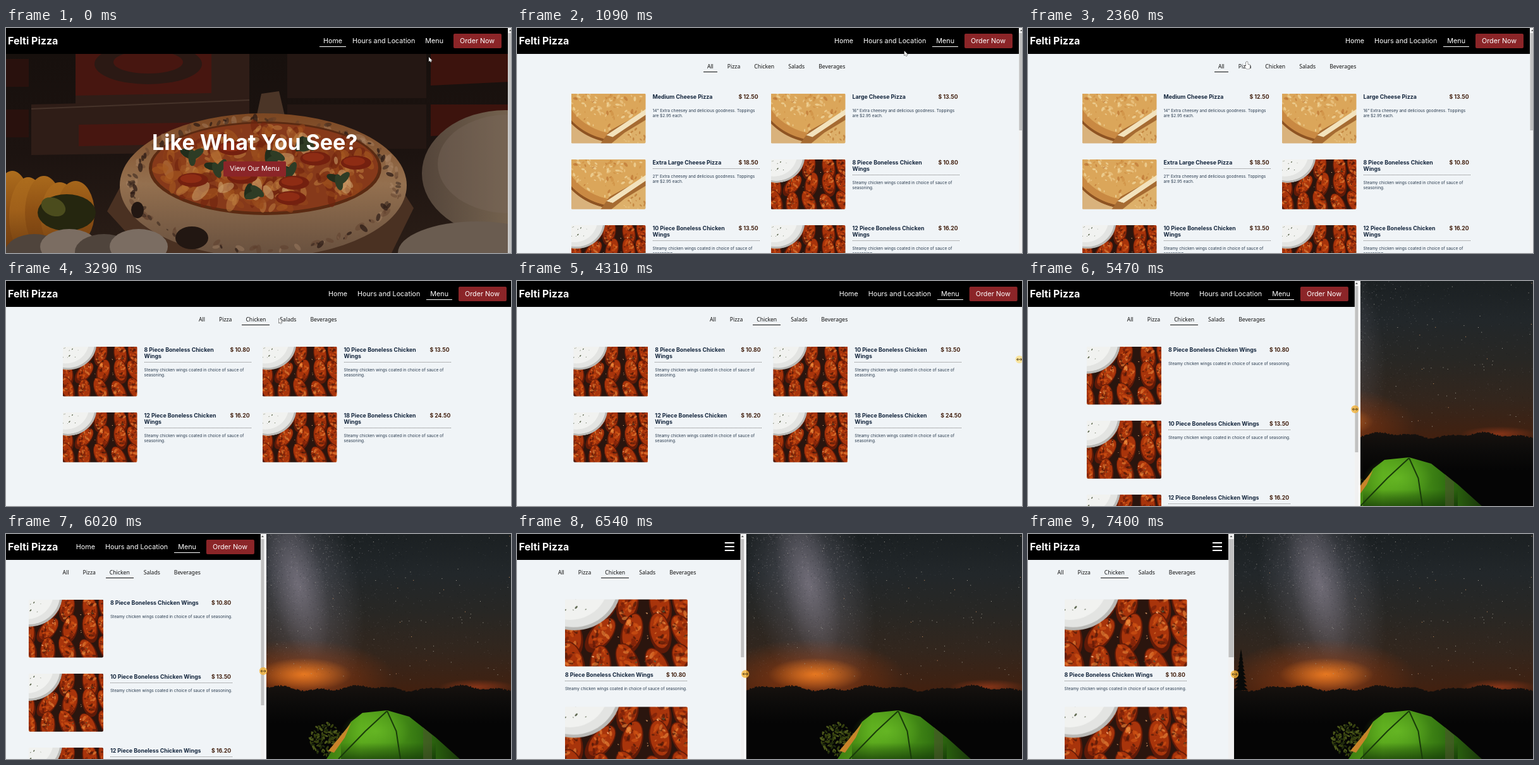
Write an HTML page with a canvas that moves like this. It is 799 px wide and 356 px high and loops after 7500 ms.

```html
<!DOCTYPE html>
<html lang="en">
<head>
<meta charset="utf-8">
<title>Felti Pizza</title>
<style>
html, body { margin: 0; width: 100%; height: 100%; overflow: hidden; background: #f0f4f7; }
canvas { display: block; }
</style>
</head>
<body>
<canvas id="stage" width="799" height="356"></canvas>
<script>
const LOOP = 7500, WIDTH = 799, HEIGHT = 356;
const stage = document.getElementById('stage').getContext('2d');
let g = stage;

// ---------- drawing helpers ----------
function rect(x, y, w, h, color) { g.fillStyle = color; g.fillRect(x, y, w, h); }
function round(x, y, w, h, r, color) {
  g.fillStyle = color; g.beginPath(); g.roundRect(x, y, w, h, r); g.fill();
}
function oval(x, y, rx, ry, color, turn = 0) {
  g.fillStyle = color; g.beginPath(); g.ellipse(x, y, rx, ry, turn, 0, 7); g.fill();
}
function trace(points) {
  g.beginPath();
  for (let i = 0; i < points.length; i += 2) g.lineTo(points[i], points[i + 1]);
}
function poly(color, ...points) { trace(points); g.fillStyle = color; g.fill(); }
function line(color, width, ...points) {
  trace(points); g.strokeStyle = color; g.lineWidth = width; g.stroke();
}
function text(str, x, y, size, color, weight = 400, family = 'Inter, sans-serif') {
  g.font = `${weight} ${size}px ${family}`; g.fillStyle = color; g.fillText(str, x, y);
  return g.measureText(str).width;
}
function textWidth(str, size, weight = 400, family = 'Inter, sans-serif') {
  g.font = `${weight} ${size}px ${family}`;
  return g.measureText(str).width;
}
function fade(x0, y0, x1, y1, ...colors) {
  const f = g.createLinearGradient(x0, y0, x1, y1);
  colors.forEach((c, i) => f.addColorStop(i / (colors.length - 1), c));
  return f;
}
function glow(x, y, rx, ry, rgb, alpha, turn = 0) {
  g.save(); g.translate(x, y); g.rotate(turn); g.scale(rx, ry);
  const f = g.createRadialGradient(0, 0, 0, 0, 0, 1);
  f.addColorStop(0, `rgba(${rgb},${alpha})`);
  f.addColorStop(1, `rgba(${rgb},0)`);
  oval(0, 0, 1, 1, f); g.restore();
}
function seeded(s) {
  return () => (s = (s * 16807) % 2147483647) / 2147483647;
}
// Random specks spread over an ellipse; inner = 1 keeps them on its rim.
function scatter(r, n, x, y, rx, ry, size, colors, inner = 0) {
  for (let i = 0; i < n; i++) {
    const a = r() * Math.PI * 2, d = Math.sqrt(inner + (1 - inner) * r()), s = size * (.3 + r());
    oval(x + rx * d * Math.cos(a), y + ry * d * Math.sin(a), s, s * .5, colors[i % colors.length], r() * 3);
  }
}
function picture(w, h, scale, paint) {
  const c = document.createElement('canvas');
  c.width = w * scale; c.height = h * scale;
  g = c.getContext('2d'); g.scale(scale, scale);
  paint(); g = stage;
  return c;
}

// ---------- pictures ----------
const wingsPic = picture(118, 79, 2, () => {
  const r = seeded(52);
  rect(0, 0, 118, 79, '#2a150e');
  for (let i = 0; i < 15; i++) {
    const x = 5 + (i % 5) * 27 + r() * 6, y = 10 + Math.floor(i / 5) * 28 + r() * 8;
    g.save(); g.translate(x, y); g.rotate(1.5 + (r() - .5) * 1.8);
    oval(0, 0, 20, 10.5, '#5f1a08');
    oval(-2, 0, 17, 9, '#a8340b');
    scatter(r, 26, -2, 0, 16, 7, 3, ['#d4561599', '#6e1c0899', '#ec8a3c99', '#3a120899']);
    g.restore();
  }
  scatter(r, 45, 70, 45, 55, 38, 1, ['#f3b27a', '#485c3a', '#2a150e']);
  oval(9, -6, 45, 43, '#b9b9b6');
  oval(8, -7, 43, 41, '#e3e4e2');
  oval(5, -9, 37, 36, '#f1f2f0');
  scatter(r, 14, 10, 6, 24, 16, 1.6, ['#59634a']);
});

const pizzaPic = picture(118, 79, 2, () => {
  const r = seeded(9);
  rect(0, 0, 118, 79, '#d9b27c');
  oval(78, -8, 101, 87, '#8e5322');
  oval(79, -10, 100, 85, '#c98943');
  oval(81, -12, 92, 77, '#dba65a');
  scatter(r, 330, 81, -12, 90, 75, 3.4, ['#f3dca5aa', '#edc988aa', '#b9702e99', '#cd8e4199']);
  poly('#a66b32', 47, 79, 61, 59, 118, 28, 118, 79);
  poly('#f2e2bd', 56, 66, 118, 25, 118, 34, 66, 69);
  poly('#ddb06a', 64, 79, 85, 62, 118, 42, 118, 79);
  scatter(r, 40, 108, 72, 24, 16, 2.4, ['#f0d092aa', '#b66e2a99']);
});

const heroPic = picture(WIDTH, HEIGHT, 1, () => {
  const r = seeded(77), stain = ['#33211a88', '#2a1a14bb'];
  rect(0, 0, WIDTH, HEIGHT, fade(0, 41, 0, HEIGHT, '#17100d', '#1c1310', '#2b1e17'));
  // stacked boxes with plain printed blocks
  for (let row = 0; row < 2; row++) {
    const y = 41 + row * 80, left = 110 - row * 70;
    poly('#2f1d17', left, y, 385, y - row * 8, 385, y + 75, left, y + 80);
    poly('#471610', left + row * 75, y + row * 32, 325, y + row * 28, 325, y + 62, left + row * 75, y + 66);
    poly('#241713', 445, y, 665, y, 665, y + 70, 445, y + 70);
    poly('#3c130d', 672, y, WIDTH, y, WIDTH, y + 44, 672, y + 50);
    rect(0, y + 8, 36, 44, '#29110d');
  }
  oval(225, 57, 85, 32, '#2b1914'); oval(225, 54, 55, 18, '#471610');
  line('#46332a', 2, 40, 128, 385, 114);
  // peel, crust and toppings
  poly('#4b3527', 404, 104, 432, 100, 446, 160, 392, 160);
  poly('#4a3122', 200, 215, 160, 290, 220, 356, 610, 356, 645, 285, 600, 215);
  oval(407, 249, 227, 114, fade(0, 136, 0, 356, '#7c4722', '#94704f', '#69513f'));
  scatter(r, 90, 407, 247, 218, 106, 7, ['#b3917355', '#5a3a2866'], .85);
  scatter(r, 60, 407, 247, 214, 108, 6, stain, .88);
  oval(410, 222, 184, 74, '#5a2a12');
  oval(410, 221, 179, 70, '#86391a');
  scatter(r, 300, 410, 221, 172, 64, 12, ['#a5581f99', '#c0803f88', '#6f230fa0', '#94461a99']);
  scatter(r, 16, 410, 225, 150, 48, 18, ['#c89b6799']);
  for (let i = 0; i < 14; i++) {
    const a = i * 2.4, d = Math.sqrt((i + .5) / 14);
    const x = 410 + 150 * d * Math.cos(a), y = 224 + 52 * d * Math.sin(a);
    if (i % 2) { oval(x, y, 24, 11, '#74200f'); oval(x - 3, y - 2, 17, 7, '#8e2c14'); }
    else for (let k = 0; k < 3; k++) oval(x + k * 7, y + (k % 2) * 6, 13, 6, k ? '#2e3c25' : '#222d1b', a + k);
  }
  oval(294, 332, 26, 18, '#221712'); oval(208, 288, 10, 13, '#221712');
  // vegetables and dough
  for (let i = 0; i < 5; i++)
    oval(10 + i * 25, 292 + (i % 2) * 6, 30, 66 - i * 4, fade(0, 220, 0, 356, '#b0701e', i % 2 ? '#a0601a' : '#8f5114', '#6e3c10'));
  oval(96, 292, 46, 29, '#25260f'); oval(75, 283, 20, 14, '#4b4c1d', .4);
  for (let i = 0; i < 4; i++) oval(45 + i * 55, 354 - (i % 2) * 8, 46, 28, ['#4f443c', '#7b6d62'][i % 2]);
  oval(790, 230, 132, 100, fade(660, 0, 799, 0, '#54453a', '#75634f'));
  oval(795, 215, 112, 78, '#78675a66');
  oval(745, 356, 125, 50, '#6a5c50');
});

const nightPic = picture(WIDTH, HEIGHT, 1, () => {
  const r = seeded(23), left = 326;
  rect(left, 0, WIDTH - left, HEIGHT, fade(0, 0, 0, 250, '#1b2022', '#22272a', '#282724', '#33261d', '#42200f'));
  glow(465, 85, 190, 95, '110,108,120', .6, 1.35);
  glow(460, 75, 130, 45, '160,150,165', .4, 1.35);
  glow(465, 226, 150, 60, '200,75,15', .55);
  glow(472, 222, 75, 26, '255,135,35', .8);
  glow(745, 242, 60, 12, '180,65,28', .6);
  for (let i = 0; i < 4500; i++) {
    const milky = i % 3, spread = milky ? (r() + r() + r() - 1.5) * 150 : (r() - .5) * 640;
    const y = r() * 225, x = 465 + spread + (milky ? 0 : 97);
    rect(x, y, 1, 1, `rgba(${r() < .4 ? '10,14,20' : '200,192,198'},${r() * (milky ? .5 - y / 500 : .2)})`);
  }
  for (let i = 0; i < 90; i++) rect(left + r() * 473, r() * 230, 1, 1, i % 7 ? '#a5a296' : '#d39867');
  for (let x = left; x < WIDTH; x += 2)
    rect(x, 243 + 3 * Math.sin(x / 24) + 2 * Math.sin(x / 9) + r() * 2, 2, HEIGHT, fade(0, 238, 0, 300, '#17120f', '#0c0b0a', '#050505'));
  for (let y = 186; y < 244; y += 6) {
    const w = 2 + (y - 186) / 6;
    poly('#090a09', 337, y - 4, 337 - w, y + 7, 337 + w, y + 7);
  }
  scatter(r, 160, 508, 325, 27, 25, 3, ['#1f2a0c', '#35400f', '#4d591b']);
  // tent
  poly(fade(510, 0, 715, 0, '#3f7f10', '#57a51b', '#4a9418', '#2f6e10', '#1b3a0a'),
    507, 356, 546, 297, 564, 283, 603, 279, 638, 289, 680, 322, 718, 356);
  poly('#c8832a', 510, 343, 546, 299, 536, 322, 519, 346);
  glow(585, 312, 55, 32, '120,205,45', .5);
  rect(530, 330, 150, 26, fade(0, 330, 0, 356, '#10300600', '#103006aa'));
  for (const foot of [526, 624])
    line('#193b0a', 2, foot, 356, (foot + 603) / 2 + 4, 312, 603, 280);
  poly('#4b562c99', 660, 306, 674, 318, 674, 356, 660, 356);
});

// ---------- page content ----------
const pizza = (size, inches, price) => ({
  kind: 'Pizza', pic: pizzaPic, price, title: size + ' Cheese Pizza',
  info: inches + '" Extra cheesey and delicious goodness. Toppings\nare $2.95 each.'
});
const wings = (count) => ({
  kind: 'Chicken', pic: wingsPic, price: (count < 18 ? count * 1.35 : 24.5).toFixed(2),
  title: count + ' Piece Boneless Chicken\nWings',
  info: 'Steamy chicken wings coated in choice of sauce of\nseasoning.'
});
const items = [
  pizza('Medium', 14, '12.50'), pizza('Large', 16, '13.50'), pizza('Extra Large', 21, '18.50'),
  ...[8, 10, 12, 18].map(wings)
];
const RED = '#8b2528', GAP = 11;

function layoutFor(W) {
  if (W > 635) return { columns: 2, w: 118, h: 79, textW: 170 };
  if (W > 388) return { columns: 1, w: 118, h: 92, textW: 194 };
  return { columns: 1, w: 194, h: 106, textW: 194, below: true };
}

function cover(pic, x, y, w, h) {
  const s = Math.max(w / 118, h / 79);
  g.save(); g.beginPath(); g.roundRect(x, y, w, h, 2); g.clip();
  g.drawImage(pic, x + (w - 118 * s) / 2, y + (h - 79 * s) / 2, 118 * s, 79 * s);
  g.restore();
}

function card(item, x, y, box) {
  const wrap = s => box.columns > 1 ? s.split('\n') : [s.replace('\n', ' ')];
  cover(item.pic, x, y, box.w, box.h);
  const tx = x + (box.below ? 0 : box.w + GAP), ty = y + (box.below ? box.h + 16 : 8);
  const title = wrap(item.title), last = ty + (title.length - 1) * 10.3;
  title.forEach((s, i) => text(s, tx, ty + i * 10.3, 8.8, '#14263d', 700));
  text('$ ' + item.price, tx + box.textW - 34, ty, 8.7, '#42200f', 700);
  if (last > 112) {
    const ruleY = Math.round(last + 6) + .5;
    g.setLineDash([1, 1]);
    line('#777', 1, Math.round(tx), ruleY, Math.round(tx + box.textW), ruleY);
    g.setLineDash([]);
  }
  wrap(item.info).forEach((s, i) => text(s, tx, last + 21 + i * 8, 6.5, '#26384c'));
}

function menu(W, filter) {
  rect(0, 41, W, 315, '#f0f4f7');
  let x = W / 2 - 112 + (W > 491 ? W * .02 : 0);
  for (const label of ['All', 'Pizza', 'Chicken', 'Salads', 'Beverages']) {
    const w = text(label, x, 64.3, 8.65, '#111', 500, '"Noto Sans", sans-serif');
    if (label === filter) rect(Math.round(x - 6), 69, Math.round(w + 12), 1, '#111');
    x += w + 22;
  }
  const box = layoutFor(W), column = box.w + GAP + box.textW + 17;
  const total = box.below ? box.w : box.columns * column - 17;
  const pitch = box.h + (box.below ? 64 : 25.3);
  items.filter(it => filter === 'All' || it.kind === filter).forEach((it, i) =>
    card(it, W / 2 - total / 2 - 4 + (i % box.columns) * column, 103.5 + Math.floor(i / box.columns) * pitch, box));
}

function hero() {
  g.drawImage(heroPic, 0, 0);
  text('Like What You See?', 231, 193, 34, '#fff', 700);
  round(344, 211, 99, 24, 2, RED);
  text('View Our Menu', 354, 226.3, 10.85, '#fff');
}

function header(W, page) {
  rect(0, 0, W, 41, '#000');
  text('Felti Pizza', 3, 26, 16, '#fff', 700);
  if (W <= 388) {
    for (const y of [13, 19, 25]) rect(W - 25, y, 15, 2, '#fff');
    return;
  }
  round(W - 86, 9, 76, 23, 2, RED);
  text('Order Now', W - 76, 24.2, 10.75, '#fff');
  let x = W - 86;
  for (const label of ['Menu', 'Hours and Location', 'Home']) {
    const w = textWidth(label, 10.75);
    x -= w + 16;
    text(label, x, 24.2, 10.75, '#fff');
    if (label === page) rect(Math.round(x - 6), 29, Math.round(w + 12), 1, '#fff');
  }
}

function scrollbar(x, w, end) {
  rect(x, 0, w, HEIGHT, '#f1f1f1');
  rect(x + .5, 8, w - 1, end - 8, '#c1c1c1');
  poly('#555', x + w / 2 - 2, 5, x + w / 2, 2.5, x + w / 2 + 2, 5);
}

// ---------- pointer ----------
const HAND = [0, 1, 2, 0, 3, 1, 3, 5, 7, 6, 7, 10, 6, 13, 1, 13, -3, 8, 0, 8];
const ARROW = [0, 0, 0, 8, 2, 6, 3, 9, 5, 8, 3, 6, 6, 6];
function pointer(x, y, shape) {
  g.save(); g.translate(x, y); g.scale(.9, .9);
  trace(shape); g.closePath();
  g.strokeStyle = '#222'; g.lineWidth = 1; g.stroke();
  g.fillStyle = '#fff'; g.fill(); g.restore();
}
function resizer(x, y, t) {
  if (t > 4300) oval(x, y, 6.2, 6.2, t < 5000 ? 'rgba(255,218,100,.6)' : 'rgba(243,178,55,.8)');
  line('#5a4218', 1, x - 4, y, x + 4, y);
  for (const d of [-1, 1]) line('#5a4218', 1, x + d * 2, y - 2, x + d * 4, y, x + d * 2, y + 2);
}

// ---------- timing ----------
function between(t, from, to) { return Math.min(1, Math.max(0, (t - from) / (to - from))); }
function track(keys, t) {
  let i = 1;
  while (i < keys.length - 1 && keys[i][0] < t) i++;
  const [a, b] = [keys[i - 1], keys[i]], k = between(t, a[0], b[0]);
  return a.slice(1).map((v, n) => v + (b[n + 1] - v) * k);
}
// time, x, y
const mouse = [
  [20, 669, 46], [280, 671, 23], [950, 671, 29], [1680, 370, 67], [2150, 345, 53], [2450, 345, 53],
  [3100, 394, 56], [3220, 394, 56], [3860, 734, 88], [4050, 797, 124]
];
// time, page width
const resize = [[4310, 802], [4900, 637], [5470, 517], [5825, 484], [6020, 403], [6930, 317]];

function render(t) {
  const page = t < 400 ? 'Home' : 'Menu';
  const filter = t < 2385 ? 'All' : t < 3125 ? 'Pizza' : 'Chicken';
  const W = filter === 'All' ? 794 : track(resize, t)[0];
  g.drawImage(nightPic, 0, 0);
  rect(0, 0, W + 9, HEIGHT, '#fff');
  g.save(); g.beginPath(); g.rect(0, 0, W, HEIGHT); g.clip();
  if (page === 'Home') hero(); else menu(W, filter);
  header(W, page);
  g.restore();
  if (filter === 'All') scrollbar(W, 8, page === 'Home' ? HEIGHT : 162);
  else if (W < 635) scrollbar(W, t < 6600 ? 6 : 9, W > 388 ? 271 : 195);
  if (t < 4040) {
    const overLink = (t > 200 && t < 1000) || (t > 2050 && t < 3280);
    pointer(...track(mouse, t), overLink ? HAND : ARROW);
  } else {
    const k = between(t, 4310, 6930);
    resizer(t < 4310 ? 797 : W - 7 + 17 * k, 222 - 98 * (1 - k) ** 2.8, t);
  }
}

const start = performance.now();
function tick() {
  render((performance.now() - start) % LOOP);
  requestAnimationFrame(tick);
}
tick();
</script>
</body>
</html>
```
